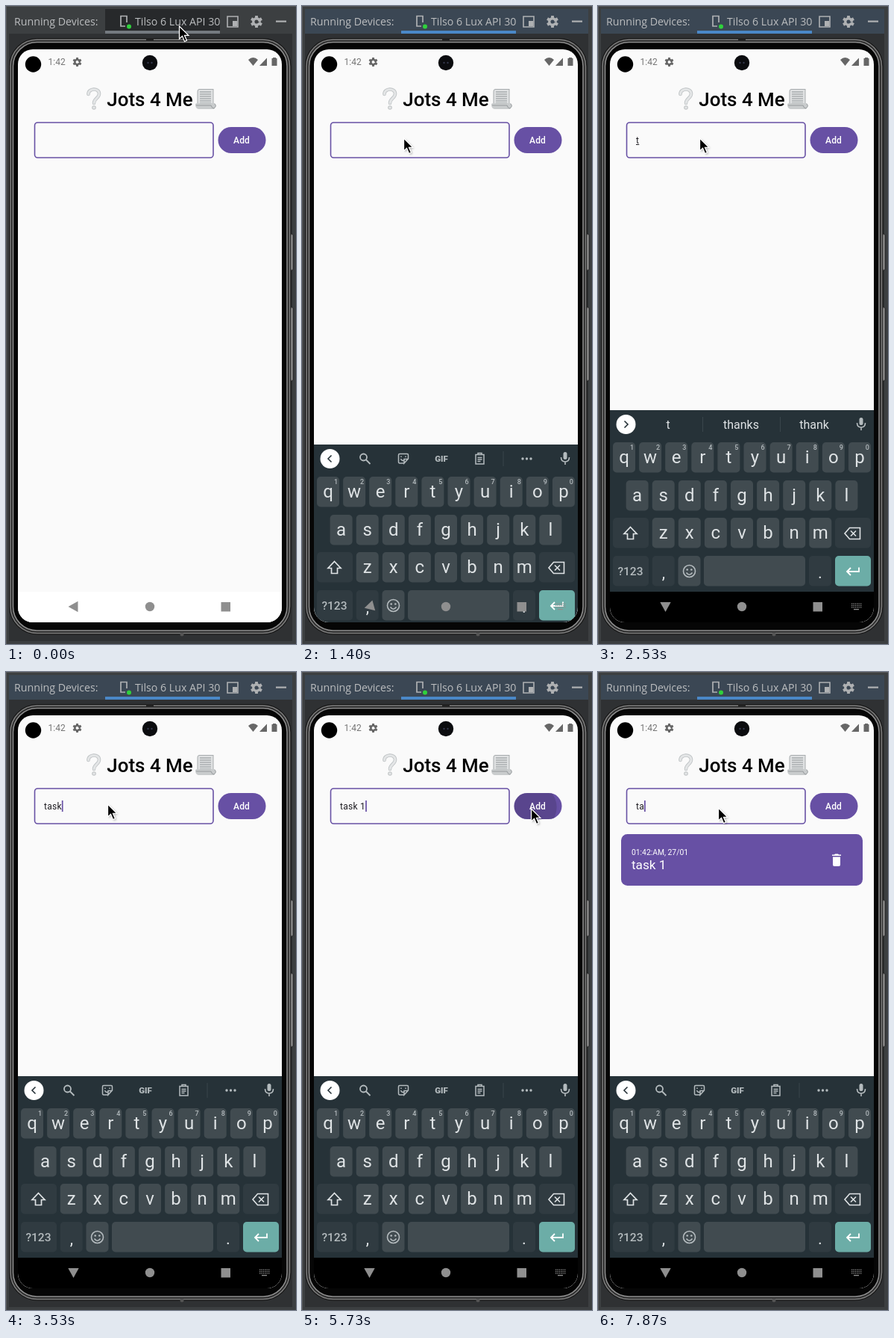
An HTML page with a canvas for the animation above (8 s loop, 389x854 px).

```html
<!DOCTYPE html>
<html lang="en">
<head>
<meta charset="utf-8">
<title>To-do app demo</title>
<style>
html, body { margin: 0; width: 100%; height: 100%; overflow: hidden; background: #3c3f41; }
canvas { display: block; width: 389px; height: 854px; }
</style>
</head>
<body>
<canvas id="stage"></canvas>
<script>
const W = 389, H = 854, LOOP = 8000, STEP = 200 / 3;
const PURPLE = '#6750a4', GREY = '#757575', KEY_INK = '#dfe3e5', ICON = '#b4bbbe';
const canvas = document.getElementById('stage');
const g = canvas.getContext('2d');
const dpr = window.devicePixelRatio || 1;
canvas.width = W * dpr;
canvas.height = H * dpr;
g.scale(dpr, dpr);

// [time, field text, suggestions]
const typing = [
  [0, ''], [2070, 't'], [2270, 't', 't thanks thank'],
  [2600, 'ta'], [2870, 'ta', 'ta take talk'],
  [3130, 'tas'], [3330, 'tas', 'tas task taste'],
  [3530, 'task'], [3800, 'task', 'task tasks taste'],
  [4130, 'task '], [4330, 'task ', 'and for is'],
  [4600, 'task 1', 'and for is'], [4870, 'task 1'],
  [5870, ''], [7330, 't'], [7530, 't', 't thanks thank'], [7870, 'ta'],
];
const caretFlips = [530, 930, 1470, 1930, 2070, 2530, 2600, 5130, 5600, 6330, 6800, 7800, 7870];
// [start, end, x, y]
const moves = [[200, 730, 136, 177], [4800, 5600, 307, 183], [5870, 6600, 161, 182]];

const clamp = v => Math.max(0, Math.min(1, v));
const span = (t, a, b) => clamp((t - a) / (b - a));
const smooth = p => p * p * (3 - 2 * p);

function box(x, y, w, h, r, fill, stroke, lw = 1) {
  g.beginPath();
  g.roundRect(x, y, w, h, r);
  if (fill) { g.fillStyle = fill; g.fill(); }
  if (stroke) { g.strokeStyle = stroke; g.lineWidth = lw; g.stroke(); }
}
function disc(x, y, r, fill) {
  g.beginPath();
  g.arc(x, y, r, 0, 7);
  g.fillStyle = fill;
  g.fill();
}
function fill(d, color) {
  g.fillStyle = color;
  g.fill(new Path2D(d), 'evenodd');
}
function line(d, color, lw = 1.5) {
  g.strokeStyle = color;
  g.lineWidth = lw;
  g.stroke(new Path2D(d));
}
function text(s, x, y, size, color, align = 'left', weight = 400, family = 'Roboto', spacing = 0) {
  g.font = `${weight} ${size}px ${family}, sans-serif`;
  g.letterSpacing = spacing + 'px';
  g.textAlign = align;
  g.fillStyle = color;
  g.fillText(s, x, y);
  return g.measureText(s).width;
}
function gear(x, y, r, color) {
  g.save();
  g.translate(x, y);
  g.fillStyle = color;
  for (let i = 0; i < 6; i++) {
    g.rotate(Math.PI / 3);
    g.fillRect(-r * .24, -r, r * .48, r * .6);
  }
  g.beginPath();
  g.arc(0, 0, r * .74, 0, 7);
  g.arc(0, 0, r * .32, 0, 7, true);
  g.fill();
  g.restore();
}

function header(t) {
  const focused = t >= 930, hover = t < 330, ink = '#bbbdbf';
  g.fillStyle = '#3c3f41';
  g.fillRect(0, 0, W, H);
  g.fillStyle = '#555759';
  g.fillRect(0, 0, 1, H);
  g.fillRect(0, 0, W, 1);
  g.fillStyle = focused ? '#3b4754' : '#3c3f41';
  g.fillRect(4, 4, 380, 33);
  g.fillStyle = '#303234';
  g.fillRect(4, 37, 380, 1);
  if (hover) {
    g.fillStyle = '#27292b';
    g.fillRect(133, 4, 154, 33);
  }
  g.fillStyle = focused ? '#4a88c7' : '#747a80';
  g.fillRect(133, 33, 154, 4);
  text('Running Devices:', 11, 26, 14.2, ink, 'left', 400, 'Open Sans');
  g.save();
  g.beginPath();
  g.rect(133, 4, 154, 33);
  g.clip();
  text('Tilso 6 Lux API 30', 173, 26, 14.2, ink, 'left', 400, 'Open Sans');
  g.restore();
  line('M160 27H154V13.5H162V22', '#afb1b3', 1.7);
  disc(165, 27.5, 3, '#2fd13c');
  box(297, 14, 14, 14, 0, null, '#afb1b3', 1.6);
  g.fillStyle = '#afb1b3';
  g.fillRect(304, 20, 6, 7);
  g.fillRect(362, 19.5, 14, 2.2);
  gear(336, 21, 8, '#afb1b3');
}

function phone() {
  g.fillStyle = '#2f3133';
  g.fillRect(4, 38, 380, 812);
  for (const [y, h] of [[305, 49], [403, 99]]) {
    box(379, y, 6, h, 2, '#8c8c8c', '#1c1c1c', .8);
    g.fillStyle = '#b0b0b0';
    g.fillRect(382, y + 2, 1.5, h - 4);
  }
  // metal rim: two bright edges with a dark groove, then the black bezel
  box(4.5, 43.5, 377.5, 797.5, 37, '#2b2b2b', '#151515', 1);
  box(6, 45, 374.5, 794.5, 36, null, '#7c7c7c', 1.5);
  box(9.5, 48.5, 367.5, 787.5, 32, '#060606', '#8e8e8e', 1.5);
  g.fillStyle = '#222';
  g.fillRect(188, 43, 10, 3);
  disc(236, 841, 2.5, '#555');
}

function pageIcon() {
  fill('M259 111H278V131H257V113Q257 111 259 111Z', '#dfe1e2');
  line('M278 111.5H259Q256.5 112 257 115V131M278 111V131', '#a7abad', 1);
  for (let y = 115; y < 131; y += 3) line(`M260 ${y}H275`, '#8f9496', 1);
  fill('M254 132Q254 130 257 130H280Q283 134 279 138H258Q254 137 254 132Z', '#c9cccd');
  line('M255 133H275Q276 137 279 137Q283 134 280 131', '#979b9d', 1);
}

function app(t) {
  g.fillStyle = '#fafafa';
  g.fillRect(16, 58, 354, 767);
  g.fillStyle = '#fff';
  g.fillRect(16, 784, 354, 41);
  disc(36.5, 78, 10.7, '#000');
  text('1:42', 56.5, 79, 12, GREY);
  gear(95.5, 75, 6, '#666');
  fill('M325 72Q331.500 66 338 72L331.500 80Z', '#666');
  fill('M350 69.500V80H340Z', '#666');
  fill('M358 70V69H362V70H363.500V80H356.500V70Z', '#666');

  g.lineCap = 'round';
  const mark = 'M110.500 118C110 110 125 109 125 117.500C125 123 118 124 118 130';
  line(mark, '#bfc3c5', 4.6);
  line(mark, '#e4e6e7', 2.8);
  g.lineCap = 'butt';
  disc(118, 136, 2.8, '#bfc3c5');
  disc(118, 136, 1.8, '#e4e6e7');
  text('Jots 4 Me', 193, 133.5, 25.9, '#000', 'center', 500);
  pageIcon();

  const [, value, words] = typing.findLast(e => e[0] <= t);
  box(38.5, 156, 239.5, 47, 4, null, PURPLE, 1.6);
  const w = text(value, 51, 184, 12, '#1d1b20', 'left', 400, 'Roboto', .28);
  if (words && value.length < 5) {
    g.fillStyle = '#1d1b20';
    g.fillRect(51, 185, w, 1);
  }
  if (caretFlips.filter(f => f <= t).length % 2) {
    g.fillStyle = PURPLE;
    g.fillRect(51 + w, 172, 1.7, 15);
  }

  box(284.5, 162, 64, 35, 17.5, PURPLE);
  const press = span(t, 5660, 5880);
  if (press > 0 && t < 6200) {
    g.save();
    g.beginPath();
    g.roundRect(284.5, 162, 64, 35, 17.5);
    g.clip();
    g.globalAlpha = .14 * (1 - span(t, 5900, 6200));
    disc(311, 181, 18 + 36 * press, '#000');
    g.restore();
  }
  text('Add', 316, 183.5, 12, '#fff', 'center', 500, 'Roboto', .1);

  if (t >= 5870) {
    box(31, 217, 324, 69, 8.5, PURPLE);
    text('01:42:AM, 27/01', 45, 245, 10.33, '#fff');
    text('task 1', 45, 264, 17.2, '#fff');
    fill('M314 246V244.500H317L318 243.500H322L323 244.500H326V246ZM315 247.500H325V258Q325 260 323 260H317Q315 260 315 258Z', '#fff');
  }
  return words;
}

function strip(words) {
  disc(37.5, 560, 13, '#fff');
  line(words ? 'M35.500 555.500L40 560L35.500 564.500' : 'M39.500 555.500L35 560L39.500 564.500', '#263238', 1.6);
  if (words) {
    words.split(' ').forEach((s, i) => text(s, 94 + 98 * i, 566, 16, KEY_INK, 'center'));
    line('M140.500 550V570M244.500 550V570', '#39454b', 1);
  } else {
    line('M87 558A4.500 4.500 0 1 1 78 558A4.500 4.500 0 1 1 87 558M86 561.500L91.500 567', ICON, 1.8);
    line('M137 566H131Q129.500 566 129.500 564V555Q129.500 553.500 131 553.500H141Q142.500 553.500 142.500 555V560L137 566V560.500H142.500M132.500 560Q134 563.500 137 562M133 556.500V558M139 556.500V558', ICON, 1.5);
    text('GIF', 187, 564, 11.5, ICON, 'center', 900);
    line('M233 554.500H244V567H233ZM236 554V552.500H241V554M235.500 558.500H241.500M235.500 561H241.500M235.500 563.500H239.500', ICON, 1.5);
    line('M270 550V570', '#39454b', 1);
    for (const x of [296, 301.5, 307]) disc(x, 560, 1.7, ICON);
  }
  box(350.5, 551, 5, 10, 2.5, ICON);
  line('M347.500 558Q347.500 564 353 564Q358.500 564 358.500 558M353 564V568', ICON, 1.6);
}

function keyboard(words) {
  const light = '#414b50', dark = '#303b41', top = [584, 635, 685, 736];
  g.fillStyle = '#263238';
  g.fillRect(16, 541, 354, 243);
  g.fillStyle = '#000';
  g.fillRect(16, 784, 354, 330);
  strip(words);
  const key = (x, row, w, color) => box(x, top[row], w, 40.5, 5, color);
  ['qwertyuiop', 'asdfghjkl', 'zxcvbnm'].forEach((letters, row) => {
    [...letters].forEach((c, i) => {
      const x = [20, 37.6, 72.7][row] + i * 35.1;
      key(x, row, 30, light);
      text(c, x + 15, top[row] + 28, 24, KEY_INK, 'center');
      if (!row) text((i + 1) % 10, x + 25.5, top[0] + 10, 9, ICON, 'center', 500);
    });
  });
  key(20, 2, 48, dark);
  key(318, 2, 48, dark);
  key(20, 3, 48, dark);
  key(72.7, 3, 30, dark);
  key(107.5, 3, 30, light);
  key(142, 3, 136, light);
  key(283, 3, 30, dark);
  key(318, 3, 48, '#6cada7');
  line('M43.500 697.500L52 706.500H47.500V713.500H39.500V706.500H35Z', KEY_INK, 1.7);
  line('M337.500 698.500H351.500V713.500H337.500L331 706ZM339 702.500L346 709.500M346 702.500L339 709.500', KEY_INK, 1.6);
  text('?123', 43.5, 762, 15.5, ICON, 'center', 500);
  text(',', 88, 766, 22, KEY_INK, 'center');
  text('.', 298, 766, 22, KEY_INK, 'center');
  line('M130.500 756.500A8 8 0 1 1 114.500 756.500A8 8 0 1 1 130.500 756.500M118.500 758.500Q122.500 764 126.500 758.500', ICON, 1.6);
  disc(119.7, 754.5, 1.3, ICON);
  disc(125.3, 754.5, 1.3, ICON);
  line('M350 751.500V757H334M339 752L334 757L339 762', '#fff', 1.8);
}

function navigation(t, turn) {
  const color = '#8f8f8f';
  g.save();
  g.translate(90.5, 804);
  g.rotate(-Math.PI / 2 * turn);
  fill('M-7 0L6 -7.200V7.200Z', color);
  g.restore();
  disc(193, 804, 6.2, color);
  g.fillStyle = color;
  g.fillRect(288.5, 798, 12.5, 12.5);
  if (t < 1200) return;
  for (let y = 0; y < 3; y++)
    for (let x = 0; x < 6; x++) g.fillRect(340 + x * 2.4, 799.5 + y * 2.4, 1.3, 1.3);
  g.fillRect(343, 807, 7, 1.3);
}

function pointer(t) {
  let x = 232, y = 27;
  for (const [a, b, toX, toY] of moves) {
    const p = smooth(span(t, a, b));
    x += (toX - x) * p;
    y += (toY - y) * p;
  }
  g.save();
  g.translate(Math.round(x) + .5, Math.round(y));
  const d = 'M0 0V17L4 13.300L7 20.500L10 19.200L7 12.300H12.300Z';
  g.shadowColor = 'rgba(0,0,0,.35)';
  g.shadowBlur = 3 * dpr;
  g.shadowOffsetX = g.shadowOffsetY = 1.5 * dpr;
  fill(d, '#000');
  g.shadowColor = 'transparent';
  line(d, '#fff', 1.3);
  g.restore();
}

function draw(now) {
  const t = Math.floor((now % LOOP + 4) / STEP) * STEP + 4;
  const rise = span(t, 1267, 1600);
  header(t);
  phone();
  g.save();
  g.beginPath();
  g.roundRect(16, 58, 354, 767, 20);
  g.clip();
  const words = app(t);
  if (rise > .05) {
    g.save();
    g.translate(0, Math.round(284 * (1 - rise) ** 3.44));
    keyboard(words);
    g.restore();
  }
  navigation(t, rise * rise);
  g.restore();
  disc(193, 76, 10.2, '#0b0c0f');
  disc(190.5, 76, 1.2, '#34384c');
  disc(195.5, 76, 1.2, '#34384c');
  pointer(t);
}

const start = performance.now();
function tick() {
  draw(performance.now() - start);
  requestAnimationFrame(tick);
}
tick();
</script>
</body>
</html>
```
